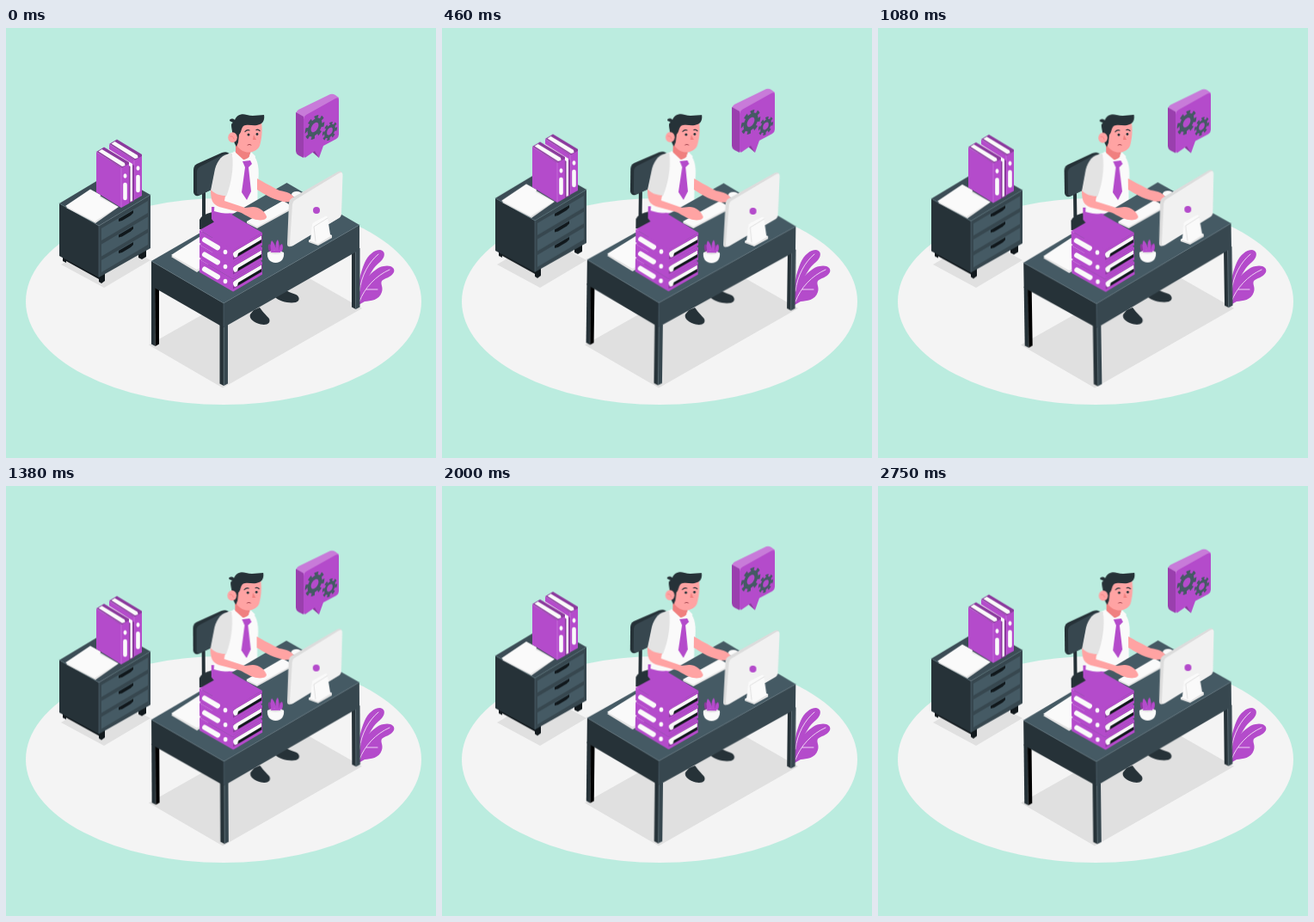
These frames come from a looping animation (500 by 500 pixels, 2790 ms). An HTML page without scripts:

```html
<!DOCTYPE html>
<html lang="en">
<head>
<meta charset="utf-8">
<title>Office desk</title>
<style>
  html, body { margin: 0; width: 100%; height: 100%; overflow: hidden; background: #bbecdf; }
  svg { display: block; width: 100%; height: 100%; }
  .float { animation: float 2.79s linear infinite; }
  .sway { animation: sway 2.79s linear infinite; transform-origin: 290px 258px; }
  /* 1.5 s cycles, cut off by the 2.79 s loop */
  @keyframes float {
    0%, 53.763% { transform: translateY(0); }
    26.882%, 80.645% { transform: translateY(-10px); }
    100% { transform: translateY(-2.8px); }
  }
  @keyframes sway {
    0% { transform: rotate(0deg); }
    13.441%, 67.204% { transform: rotate(1deg); }
    40.323%, 94.086% { transform: rotate(-1deg); }
    100% { transform: rotate(-.56deg); }
  }
  .p { fill: #b44bcb; }
  .pd { fill: #8b3a9d; }
  .pl { fill: #c87bd9; }
  .d { fill: #263238; }
  .m { fill: #37474f; }
  .l { fill: #455a64; }
  .k { fill: #11181c; }
  .w { fill: #fafafa; }
  .g { fill: #e3e3e3; }
  .s { fill: #ffa3a3; }
  .sd { fill: #f0807f; }
  .line { fill: none; stroke-linecap: round; stroke-linejoin: round; }
  .edge { stroke: #5b6e78; stroke-width: .5; }
  .vein { stroke: #f4e3f8; stroke-width: .9; }
</style>
</head>
<body>
<svg viewBox="0 0 500 500">
  <defs>
    <g id="binder">
      <path class="p" d="M225 235 264 258V272.500L225 250Z"/>
      <path class="pd" d="M264 258 298 238V252.500L264 272.500Z"/>
      <path class="k" d="M268 259 297 242V249.500L268 266.500Z"/>
      <path class="w" d="M268 258.500 297 241.500V246L270 262 269 266 266 267Q263 264 264.500 261Z"/>
      <path class="p" d="M225 235 260 215.500 298 238 264 258Z"/>
      <path class="p" d="M264 258 298 238V240.500L264 260.500ZM264 269.500 298 249.500V252.500L264 272.500Z"/>
      <path class="line" stroke="#fafafa" stroke-width="6" d="M231 246.500 246 255.300"/>
      <ellipse class="w" cx="255" cy="260.500" rx="2.300" ry="2.800"/>
    </g>
    <g id="upright">
      <path class="p" d="M105 144 134 162V209L105 191Z"/>
      <path class="p" d="M134 162 143 157V204L134 209Z"/>
      <path class="pd" d="M105 144 114 138.500 143 156 143 158 134 163Z"/>
      <path class="w" d="M107.500 143.500 111.500 141 138 157 138.500 160 135 161Z"/>
      <path class="line" stroke="#fafafa" stroke-width="4.600" d="M138.500 182V198"/>
      <ellipse class="w" cx="138.500" cy="172" rx="2" ry="2.700"/>
      <path class="line" stroke="#d08be0" stroke-width=".5" d="M105 144 134 162V208"/>
    </g>
    <g id="drawer">
      <path class="l" d="M111 233 165 201V215L111 247Z"/>
      <path class="k" d="M131 222 148 212V215L145 218 135 224 131 225Z"/>
    </g>
    <g id="leg">
      <path class="d" d="M0 0H4.700V71L0 68.500Z"/>
      <path class="m" d="M4.700 0H9.500V68.500L4.700 71Z"/>
      <path class="line edge" d="M4.700 0V70"/>
    </g>
    <g id="gear" fill="none" stroke="#455a64">
      <circle r="7.400" stroke-width="4.600"/>
      <circle r="11" stroke-width="4" pathLength="16" stroke-dasharray="1.050 .95"/>
    </g>
  </defs>

  <rect width="500" height="500" fill="#bbecdf"/>
  <ellipse cx="253" cy="318" rx="230" ry="120" fill="#f4f4f4"/>
  <g fill="#e0e0e0">
    <path d="M166 368.500 252 418.500 414 326 328 277Z"/>
    <path d="M64 275 114 302 168 270 118 243Z"/>
  </g>

  <!-- floor plant -->
  <path class="p" d="M410 318C408 302 412 284 417 273C421 264 428 258 435 258C442 259 441 267 435 272C427 278 423 287 418 296Z"/>
  <path class="p" d="M410 322C409 308 413 297 420 290C426 284 432 278 439 277C447 275 453 279 451 284C448 290 440 291 437 294C435 298 439 301 437 307C434 317 424 317 417 318Z"/>
  <path class="line vein" d="M411 306C413 288 422 272 433 263M411 318C417 302 430 288 446 281M419 304H432"/>

  <!-- cabinet -->
  <g class="float">
    <path class="k" d="M66 262 115 286V294L111 297 108 295V292L70 271V273L66 271ZM154 260 163 256V266L158 269 154 267Z"/>
    <path class="d" d="M62 204 108 230V290L62 265Z"/>
    <path class="m" d="M108 230 168 194V256L108 290Z"/>
    <path fill="#3c4d56" d="M62 204 122 168 168 194 108 230Z"/>
    <path class="line edge" d="M62 204 108 230V289M108 230 168 194"/>
    <use href="#drawer"/>
    <use href="#drawer" y="18.500"/>
    <use href="#drawer" y="37"/>
    <path class="g" d="M70 209 99 189 131 208 104 227Z"/>
    <path class="w" d="M69 207 98 187.500 110 194 109 197 130 208 103 225Z"/>
    <use href="#upright" x="15" y="-9"/>
    <path class="pd" d="M113 145 118 142 149 160V201L143 204Z"/>
    <path class="w" d="M116 143 120 141 147 158V201L144.500 202V161Z"/>
    <use href="#upright"/>
  </g>

  <g class="sway">
    <!-- chair -->
    <path class="d" d="M228 190H232V219H228Z"/>
    <path class="d" d="M225 223Q227 217 240 214L262 216V234H225Z"/>
    <path class="d" d="M218 165Q218 160 222 158L251 145Q258 143 260 147V178L224 195Q219 196 218 191Z"/>
    <path class="m" d="M222 167Q222 163 226 161L253 147Q260 145 260 150V178L226 194Q222 195 222 191Z"/>

    <!-- shoes -->
    <path class="d" d="M284 333C282 338 289 343 296 344.500C304 346 308 343 306 338C303 334 299 331 295 325L288 328Z"/>
    <path class="d" d="M313 313C318 318 329 320.500 337 319C343 317 341 311 336 309.500C331 308 327 306 324 304Z"/>

    <!-- body -->
    <path class="p" d="M239 208 290 208 290 225 250 236 239 222Z"/>
    <path class="w" d="M266 144C255 147 247 153 245 165L242 213C254 217 275 217 292 208C293 202 292 193 293 180C295 164 293 153 287 147Z"/>
    <path class="g" d="M263 146C251 146 246 154 243 164L238 189C242 194 250 197 256 196C262 181 265 163 263 146Z"/>
    <path class="sd" d="M267 130V147C270 154 277 155 283 150L285 141Z"/>
    <path class="w" d="M265 143 277 154 271 160 263 149ZM285 144 290 149 287 160 281 154Z"/>
    <path class="p" d="M275 155 284 154 286 158 282 162 285 190 280 200 274 191 278 162Z"/>

    <!-- head -->
    <path class="s" d="M268 113 297 109C298.500 121 297 130 295 137C292 143 286 145 280 144.500C273 143 269 139 266 132Z"/>
    <path class="d" d="M260 108C260 105 264 105 266 107C268 102 273 99 280 101C287 103 294 101 300 101C301 106 299 111 295 112C288 115 282 111 276 114C273 117 274 121 271 124L270 133 268 138C265 134 263 126 263 120C262 114 261 111 264 110Z"/>
    <ellipse class="s" cx="263.500" cy="127.300" rx="5.300" ry="6"/>
    <path class="line" stroke="#f0807f" stroke-width=".8" d="M261 126Q264 125 265 129"/>
    <circle class="d" cx="282" cy="124" r="1.500"/>
    <circle class="d" cx="292" cy="123.500" r="1.400"/>
    <path class="line" stroke="#263238" stroke-width="1.200" d="M278 120.500Q280 118 283 119M291 118.500Q293 117.500 295 119.500"/>
    <path class="sd" d="M288 124 291 130 287 130Z"/>
    <path class="line" stroke="#9a3d48" stroke-width=".9" d="M281 136Q283 134.500 285 136"/>

    <!-- desk -->
    <g transform="translate(169 299)">
      <path class="d" d="M0 0H4.700V71L0 68.500Z"/>
      <path fill="#000" d="M4.200 0H9V68.500L4.700 71Z"/>
    </g>
    <use href="#leg" x="402" y="256"/>
    <use href="#leg" x="248.500" y="345"/>
    <path class="d" d="M169 271 253 320V348.300L169 300Z"/>
    <path class="m" d="M253 320 411 229V258L253 348.300Z"/>
    <path class="l" d="M169 271 326.500 180 411 229 253 320Z"/>
    <path class="line edge" d="M169 271 253 320 411 229M253 320V347"/>

    <!-- keyboard and mouse -->
    <path class="g" d="M280 225 322 201 334 208V210L292 233 280 227Z"/>
    <path class="w" d="M280 225 322 201 334 208 292 231Z"/>
    <ellipse class="w" cx="338" cy="193.500" rx="6" ry="3.500"/>

    <!-- arms -->
    <path class="s" d="M292 175C299 179 310 185 318 189C326 190 334 193 335 198C333 203 325 203 319 201C308 198 300 193 292 188Z"/>
    <path class="s" d="M238 188C238 200 240 205 248 208L271 214C277 216 281 220 288 222C296 225 304 223 303 219C300 212 294 208 287 208L278 209L254 201L255 195C249 195 243 193 238 188Z"/>

    <!-- monitor -->
    <path fill="#dcdcdc" d="M329 203Q329 200 332 198L386 167Q391 165 391 170L390 215Q390 219 387 221L331 254Q327 255 327 251Z"/>
    <path fill="#f1f1f1" d="M333 205Q333 202 336 200L387 169Q391.500 166 391.500 171L390 215Q390 219 387 221L334 253Q330 255 330 251Z"/>
    <circle class="p" cx="361" cy="212" r="4"/>
    <path class="g" d="M352 247 367 238 379 241V244L363 253 352 249Z"/>
    <path class="w" d="M352 247 367 237 379 241 363 251Z"/>
    <path class="w" d="M356 229Q356 227 358 226L371 219Q374 218 374 221L377 240 360 249 354 246Z"/>
    <path class="line" stroke="#d5d5d5" stroke-width=".7" d="M360 248 358 231 374 221"/>

    <!-- potted plant -->
    <path class="pd" d="M307 262Q303 254 306 251Q311 254 313 260Q315 253 321 251Q324 257 318 262Z"/>
    <path class="p" d="M309 262Q306 251 309 247Q313 251 313.500 257Q313 249 316 246Q319 252 316 262ZM317 262Q317 254 321 251Q323 256 320 262Z"/>
    <path class="w" d="M304 261Q313 256 323 261C324 268 320 273 313.500 273C307 273 303 268 304 261Z"/>
    <path class="g" d="M305 261Q313 265 322 261Q313 258 305 261Z"/>
    <path class="p" d="M308 261 309 255 312 259 315 252 317 259 320 255 319 261Z"/>

    <!-- papers and binders -->
    <path class="g" d="M192 266 228 243 258 260 222 284Z"/>
    <path class="w" d="M192 264 228 241 258 258 222 281Z"/>
    <use href="#binder" y="34"/>
    <use href="#binder" y="17"/>
    <use href="#binder"/>
  </g>

  <!-- speech bubble -->
  <g class="float">
    <path class="pl" d="M337 100Q337 97 340 95L377 77Q380 76 383 78L387 81V90L347 108Z"/>
    <path fill="#9a3fae" d="M337 98 346 103V151L340 148Q337 146 337 143Z"/>
    <path class="pd" d="M355 141 360 139 364 151 357 145Z"/>
    <path class="p" d="M346 106Q346 103 349 101L383 82Q387 80 387 84V124Q387 127 384 129L369 137 364 151 359 143 349 150Q346 152 346 148Z"/>
    <use href="#gear" transform="matrix(.87 -.5 0 1 359 115.500)"/>
    <use href="#gear" transform="matrix(.66 -.38 0 .76 376.500 120)"/>
  </g>
</svg>
</body>
</html>
```
